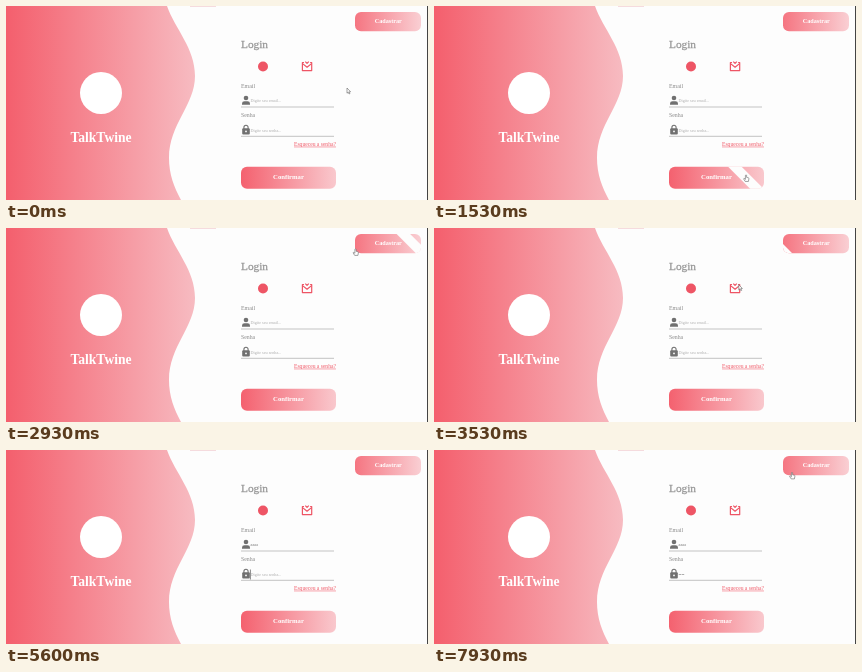
Write an HTML page that moves like this. It is 422 by 194 pixels and loops after 8 s.

```html
<!DOCTYPE html>
<html lang="pt">
<head>
<meta charset="utf-8">
<title>Login</title>
<style>
  html, body { margin: 0; width: 100%; height: 100%; overflow: hidden; background: #fdfdfd; }
  svg { display: block; width: 100vw; height: 100vh; }
  text { font-family: "Liberation Serif", "Noto Serif", serif; }
  .bold { font-weight: bold; fill: #fff; text-anchor: middle; }
  .label { fill: #8a8a8a; }
  .field { font-size: 4.2px; }
  .icon { fill: #707070; }
  .rule { stroke: #b4b4b4; stroke-width: .8; }
  .shine { fill: #fdfdfd; }
</style>
</head>
<body>
<svg viewBox="0 0 422 194">
  <defs>
    <linearGradient id="panelPink">
      <stop offset="0" stop-color="#f45f6d"/>
      <stop offset="1" stop-color="#f7bbc1"/>
    </linearGradient>
    <linearGradient id="buttonPink">
      <stop offset="0" stop-color="#f4616f"/>
      <stop offset="1" stop-color="#f9c8cd"/>
    </linearGradient>
    <clipPath id="confirmClip"><rect x="235" y="160.7" width="95" height="22" rx="6"/></clipPath>
    <clipPath id="registerClip"><rect x="349" y="6" width="66" height="19.2" rx="6"/></clipPath>
  </defs>
  <rect width="422" height="194" fill="#fdfdfd"/>
  <rect x="184" width="26" height=".7" fill="#f3cdd1"/>
  <rect x="421" width="1" height="194" fill="#444"/>

  <path fill="url(#panelPink)" d="M0 0H161C169 23 189 42 189 70C189 99 163 118 163 152C163 168 168 181 175 194H0Z"/>
  <circle cx="95" cy="87" r="21" fill="#fff"/>
  <text class="bold" x="95" y="136" font-size="13.6">TalkTwine</text>

  <text x="235" y="41.5" font-size="11.3" fill="#999" stroke="#999" stroke-width=".3">Login</text>
  <circle cx="257" cy="60.5" r="5" fill="#ee5565"/>
  <g fill="none" stroke="#ee5565" stroke-width="1.2" stroke-linejoin="round">
    <path d="M298 56.5H296.4V64.6H305.7V56.5H304.1"/>
    <path d="M296.6 57.6L301.05 61.2L305.5 57.6M299.3 55.6L301.05 57.4L302.8 55.6"/>
  </g>

  <text class="label" x="235" y="81.5" font-size="5.9">Email</text>
  <g class="icon">
    <circle cx="240" cy="92" r="2.3"/>
    <path d="M236 98.8V97.6Q236 95.2 238.5 95.2H241.5Q244 95.2 244 97.6V98.8Z"/>
  </g>
  <text class="field" id="email" x="244.6" y="96.3"></text>
  <path class="rule" d="M235 101H328M235 130.3H328"/>

  <text class="label" x="235" y="110.5" font-size="5.8">Senha</text>
  <g class="icon">
    <rect x="236.2" y="122.3" width="7.6" height="6.2" rx="1"/>
    <path d="M237.9 123V121.4a2.1 2.1 0 0 1 4.2 0V123" fill="none" stroke="#707070" stroke-width="1.1"/>
    <circle cx="240" cy="125.4" r=".9" fill="#fdfdfd"/>
  </g>
  <text class="field" id="password" x="244.6" y="125.6"></text>
  <text x="288" y="139.7" font-size="5.6" fill="#f05b69" text-decoration="underline">Esqueceu a senha?</text>

  <g clip-path="url(#confirmClip)">
    <rect x="235" y="160" width="95" height="23" fill="url(#buttonPink)"/>
    <text class="bold" x="282.5" y="172.8" font-size="6.7">Confirmar</text>
    <path class="shine" id="confirmShine"/>
  </g>
  <g clip-path="url(#registerClip)">
    <rect x="349" y="6" width="66" height="20" fill="url(#buttonPink)" opacity=".87"/>
    <text class="bold" x="382.3" y="17" font-size="6.2">Cadastrar</text>
    <path class="shine" id="registerShine"/>
  </g>

  <path id="caret" stroke="#555" stroke-width=".7"/>
  <path id="pointer" fill="#fff" stroke="#666" stroke-width=".6" stroke-linejoin="round"/>
</svg>
<script>
  const LOOP = 8000;
  const $ = id => document.getElementById(id);
  const clamp = v => Math.min(1, Math.max(0, v));
  const easeOut = u => 1 - (1 - u) ** 2;
  const smooth = u => u * u * (3 - 2 * u);
  const show = (node, visible) => { node.style.display = visible ? "" : "none"; };

  const confirmHover = { enter: 620, leave: 1730, duration: 1400, from: 45, range: 116 };
  const registerHover = { enter: 2170, leave: 2960, duration: 1000, from: 318, range: 85 };

  // Places the pointer visits: time, x, y.
  const stops = [
    [60, 341, 82], [700, 313, 172], [1600, 312, 169], [2200, 353, 21], [2930, 349.5, 21],
    [4150, 258, 94], [6600, 258, 123], [7300, 370, 36], [7930, 358, 22.5]
  ];
  const shapes = {
    arrow: "M0 0V5.2L1.2 4.1L2.1 6L2.9 5.6L2.1 3.8H3.6Z",
    hand: "M-.6 .2Q0 -.4 .6 .2V2.3L2.5 2.8Q3 3 2.9 3.7L2.4 6.4H-.8L-2.4 3.9Q-2.3 3.1 -1.5 3.5L-.6 4.3Z",
    beam: "M-1 -2.5H1M0 -2.5V2.5M-1 2.5H1"
  };

  // A 45-degree band that sweeps in on hover and returns afterwards.
  function shine(id, { enter, leave, duration, from, range }, t) {
    const sweep = easeOut(clamp((Math.min(t, leave) - enter) / duration));
    const back = easeOut(clamp((t - leave) / duration));
    const edge = from + range * sweep * (1 - back);
    $(id).setAttribute("d", `M${edge - 13.5} 0H${edge}l194 194h-13.5Z`);
  }

  // Types four glyphs at a steady pace and returns how many are there.
  function field(id, start, glyph, hint, t) {
    const count = Math.min(4, Math.max(0, Math.floor((t - start) / 150) + 1));
    $(id).textContent = count ? glyph.repeat(count) : hint;
    $(id).setAttribute("fill", count ? "#777" : "#adadad");
    return count;
  }

  function pointerAt(t) {
    const next = stops.findIndex(stop => stop[0] > t);
    const [t1, x1, y1] = stops.at(next);
    const [t0, x0, y0] = stops[Math.max(0, (next < 0 ? stops.length : next) - 1)];
    const u = t1 > t0 ? smooth(clamp((t - t0) / (t1 - t0))) : 0;
    return [x0 + (x1 - x0) * u, y0 + (y1 - y0) * u];
  }

  function pointerShape(x, y) {
    const inside = (l, top, r, b) => x >= l && x <= r && y >= top && y <= b;
    if (inside(235, 160.5, 330, 183) || inside(349, 6, 415, 25.5) || inside(288, 135, 330, 141)) return "hand";
    if (inside(244, 88, 328, 101) || inside(244, 117, 328, 130)) return "beam";
    return "arrow";
  }

  function draw(t) {
    shine("confirmShine", confirmHover, t);
    shine("registerShine", registerHover, t);

    const emailCount = field("email", 4800, "a", "Digite seu email...", t);
    const passwordCount = field("password", 5800, "•", "Digite seu senha...", t);
    const onPassword = t >= 5600;
    const caretX = 244.4 + (onPassword ? passwordCount * 1.47 : emailCount * 1.87);
    $("caret").setAttribute("d", `M${caretX} ${onPassword ? 119.5 : 90}v10`);
    show($("caret"), t >= 4260 && t < 6600);

    const [x, y] = pointerAt(t);
    $("pointer").setAttribute("d", shapes[pointerShape(x, y)]);
    $("pointer").setAttribute("transform", `translate(${x} ${y})`);
    show($("pointer"), t < 4200 || t >= 6600);
  }

  const start = performance.now();
  function tick() {
    draw((performance.now() - start) % LOOP);
    requestAnimationFrame(tick);
  }
  tick();
</script>
</body>
</html>
```
